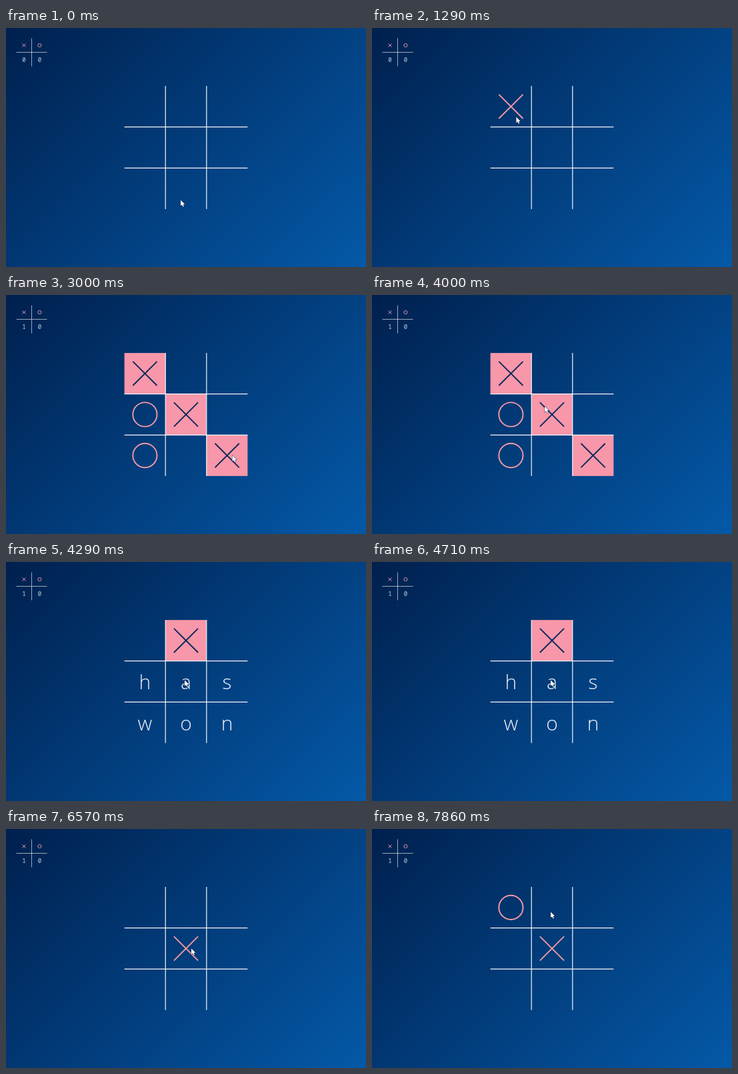
An HTML page with a canvas that plays this animation: 540 px wide and 359 px high, repeating every 8000 ms.

```html
<!DOCTYPE html>
<html lang="en">
<head>
<meta charset="utf-8">
<title>Noughts and crosses</title>
<style>
  html, body { margin: 0; width: 100%; height: 100%; overflow: hidden; background: #033b7a; }
  canvas { display: block; width: 540px; height: 359px; }
</style>
</head>
<body>
<canvas id="stage" width="540" height="359"></canvas>
<script>
const W = 540, H = 359, CELL = 61.6;
const PINK = '#f39aa5', TILE = '#f797a9', NAVY = '#06285a';
const ctx = document.getElementById('stage').getContext('2d');

// All times below are counted in steps of one seventh of a second.
const FPS = 7, STEPS = 56, GLIDE = 3;
const WIN = 21, MESSAGE = 30, RESET = 41;

const midX = col => W / 2 + (col - 1) * CELL;
const midY = row => H / 2 + (row - 1) * CELL;

// Players take turns at an even pace on cells numbered row by row.
const play = (cells, first, gap, end) => cells.map((cell, i) => ({
  kind: i % 2 ? 'o' : 'x',
  col: cell % 3,
  row: Math.floor(cell / 3),
  start: first + i * gap,
  end
}));
const MOVES = [...play([0, 3, 4, 6, 8], 8, 3, MESSAGE), ...play([4, 0], 44, 6, STEPS)];

// The pointer visits every move and a few resting places.
const stop = (at, x, y) => ({ at, x, y });
const STOPS = [
  stop(0, 262, 258.5),
  stop(2, 267, 186),
  stop(25, 256, 163.5),
  stop(MESSAGE, 268, 177.5),
  stop(54, 268, 124.5),
  ...MOVES.map(m => stop(m.start, midX(m.col) + 8, midY(m.row)))
].sort((a, b) => a.at - b.at);

function pointerAt(step) {
  const i = STOPS.findIndex(s => s.at > step);
  if (i < 0) return STOPS[STOPS.length - 1];
  const from = STOPS[i - 1], to = STOPS[i];
  const time = Math.min(GLIDE, to.at - from.at);
  const k = Math.max(0, 1 - (to.at - step) / time);
  const e = k * k * (3 - 2 * k);
  return { x: from.x + (to.x - from.x) * e, y: from.y + (to.y - from.y) * e };
}

function pen(color, width) {
  ctx.strokeStyle = color;
  ctx.lineWidth = width;
}

function line(x0, y0, x1, y1) {
  ctx.beginPath();
  ctx.moveTo(x0, y0);
  ctx.lineTo(x1, y1);
  ctx.stroke();
}

function cross(x, y, r) {
  line(x - r, y - r, x + r, y + r);
  line(x + r, y - r, x - r, y + r);
}

function ring(x, y, r) {
  ctx.beginPath();
  ctx.arc(x, y, r, 0, Math.PI * 2);
  ctx.stroke();
}

function label(text, x, y, font, color) {
  ctx.font = font;
  ctx.textAlign = 'center';
  ctx.fillStyle = color;
  ctx.fillText(text, x, y);
}

function background() {
  // 135 degree gradient across the whole stage
  const d = (W + H) / 4;
  const g = ctx.createLinearGradient(W / 2 - d, H / 2 - d, W / 2 + d, H / 2 + d);
  g.addColorStop(0, '#00204e');
  g.addColorStop(1, '#0459a8');
  ctx.fillStyle = g;
  ctx.fillRect(0, 0, W, H);
}

function scoreboard(step) {
  const left = 27, right = 50.4;
  pen('rgba(255,255,255,.6)', 1);
  line(38.5, 15.5, 38.5, 57.5);
  line(15.5, 36.5, 61.5, 36.5);
  pen('#cf94b0', 1);
  cross(left, 26, 2.5);
  ring(right, 26, 2.6);
  const font = '9px "Noto Sans Mono", monospace';
  label(step < WIN ? '0' : '1', left, 50.6, font, '#c5d2e4');
  label('0', right, 50.6, font, '#c5d2e4');
}

function tile(col, row) {
  ctx.fillStyle = TILE;
  ctx.fillRect(midX(col) - CELL / 2, midY(row) - CELL / 2, CELL, CELL);
}

function grid() {
  const half = CELL * 1.5;
  pen('#f4f8fc', 1.2);
  for (const side of [-0.5, 0.5]) {
    const x = W / 2 + side * CELL, y = H / 2 + side * CELL;
    line(x, H / 2 - half, x, H / 2 + half);
    line(W / 2 - half, y, W / 2 + half, y);
  }
}

function mark(kind, col, row, color) {
  pen(color, 1.9);
  (kind === 'x' ? cross : ring)(midX(col), midY(row), 18.1);
}

function message() {
  mark('x', 1, 0, NAVY);
  [...'haswon'].forEach((ch, i) => {
    const row = 1 + Math.floor(i / 3);
    label(ch, midX(i % 3), midY(row) + 11.4, '300 30px "Open Sans", sans-serif', '#eef3f9');
  });
}

function pointer({ x, y }) {
  const shape = [[0, 0], [0, 8.6], [2, 6.9], [3.5, 10], [4.9, 9.4], [3.6, 6.4], [6.2, 6.2]];
  ctx.beginPath();
  for (const [dx, dy] of shape) ctx.lineTo(x + dx, y + dy);
  ctx.closePath();
  pen('rgba(10,25,50,.6)', 1.2);
  ctx.stroke();
  ctx.fillStyle = '#fff';
  ctx.fill();
}

function draw(step) {
  const won = step >= WIN && step < MESSAGE;
  const told = step >= MESSAGE && step < RESET;
  background();
  scoreboard(step);
  if (won) for (let i = 0; i < 3; i++) tile(i, i);
  if (told) tile(1, 0);
  grid();
  if (told) message();
  for (const m of MOVES) {
    if (step >= m.start && step < m.end) {
      mark(m.kind, m.col, m.row, won && m.kind === 'x' ? NAVY : PINK);
    }
  }
  pointer(pointerAt(step));
}

const begin = performance.now();
function tick() {
  const t = (performance.now() - begin) % (STEPS * 1000 / FPS);
  // a few milliseconds of lead keep each step on its rounded time
  draw(Math.min(Math.floor((t + 5) * FPS / 1000), STEPS - 1));
  requestAnimationFrame(tick);
}
tick();
</script>
</body>
</html>
```
